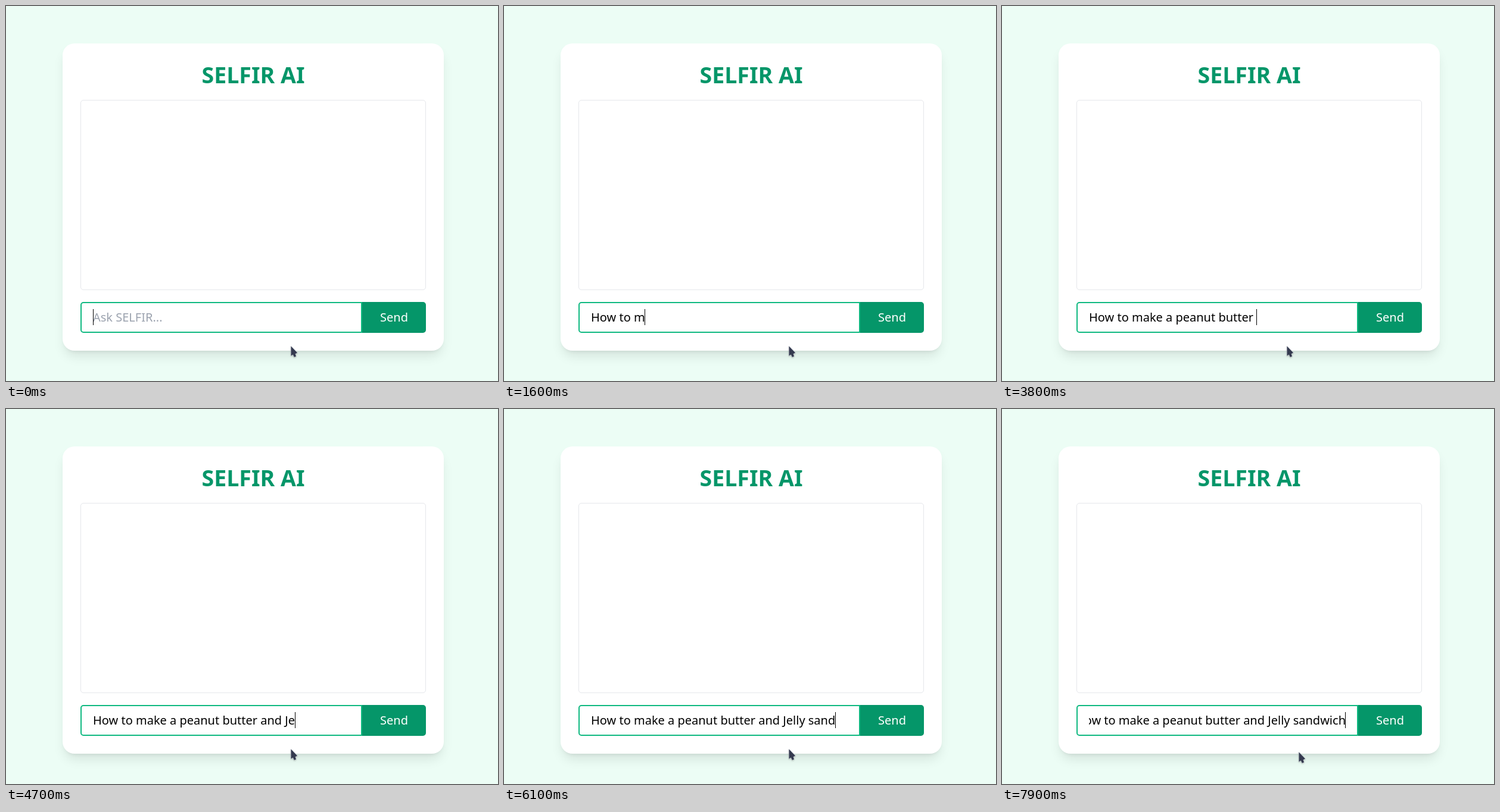
Animation, 826 px wide and 631 px high, one loop 8000 ms. Source, as an HTML page:

```html
<!DOCTYPE html>
<html lang="en">
<head>
<meta charset="utf-8">
<title>Chat prompt</title>
<style>
  * { box-sizing: border-box; }
  html, body { margin: 0; width: 100%; height: 100%; overflow: hidden; }
  body {
    position: relative;
    background: #ecfdf5;
    font: 20px/27px "Noto Sans", sans-serif;
  }
  body > *, .field > * { position: absolute; }
  .card {
    left: 95px; top: 63px; width: 640px; height: 517px;
    border-radius: 20px;
    background: #fff;
    box-shadow: 0 12.5px 18.75px -3.75px rgba(0, 0, 0, .1),
                0 5px 7.5px -5px rgba(0, 0, 0, .1);
  }
  h1 {
    left: 125px; top: 93px; width: 580px; margin: 0;
    font-size: 37.5px; line-height: 45px; font-weight: 700;
    text-align: center;
    color: #059669;
  }
  .log {
    left: 125px; top: 158px; width: 580px; height: 320px;
    border: 1px solid #e5e7eb;
    border-radius: 5px;
  }
  .frame {
    left: 125px; top: 498px; width: 473px; height: 52px;
    border: 2px solid #10b981;
    border-radius: 5px 0 0 5px;
  }
  .send {
    left: 598px; top: 498px; width: 107px; height: 52px;
    padding-top: 12px;
    border-radius: 0 5px 5px 0;
    background: #059669;
    color: #fff;
    text-align: center;
  }
  .field {
    left: 146px; top: 510px; width: 431px; height: 27px;
    overflow: hidden;
    white-space: pre;
    color: #000;
  }
  .hint { color: #9ca3af; }
  .caret { top: 0; left: 0; width: 1px; height: 27px; background: #000; }
  .pointer { left: 476px; top: 570px; filter: drop-shadow(0 1px 1px rgba(0, 0, 0, .25)); }
</style>
</head>
<body>
<div class="card"></div>
<h1>SELFIR AI</h1>
<div class="log"></div>
<div class="frame"></div>
<div class="send">Send</div>
<div class="field">
  <span class="hint">Ask SELFIR...</span>
  <span class="typed"></span>
  <div class="caret"></div>
</div>
<svg class="pointer" width="18" height="26" viewBox="0 0 18 26">
  <path d="M2.5 2.5V18.5L5.8 16.6L7.8 20.8L11 19.4L9.6 15.2L13 13.6Z"
        fill="#343a4f" stroke="#d5dbe0" stroke-width="1" paint-order="stroke"/>
</svg>
<script>
  const LOOP = 8000;
  const KEY_GAP = 100;
  const MOVE_AT = 7900;

  // Bursts of typing: start time, then the text added by each keystroke.
  const bursts = [
    [300, "H"], [600, "ow"], [1000, " to"], [1400, " "],
    [1600, "make a "], [2400, "peanut "], [3200, "butte"],
    [3800, ["r ", "a", "n", "d", " "]], [4500, "J"], [4700, "el"],
    [5000, "ly "], [5400, "san"], [6100, "dw"], [6600, "i"], [6900, "ch"]
  ];
  const keys = bursts.flatMap(([start, parts]) =>
    [...parts].map((text, i) => ({ at: start + i * KEY_GAP, text })));

  const find = name => document.querySelector("." + name);
  const field = find("field"), hint = find("hint"), typed = find("typed");
  const caret = find("caret"), pointer = find("pointer");

  function draw(t) {
    const text = keys.filter(k => k.at <= t).map(k => k.text).join("");
    if (typed.textContent !== text) typed.textContent = text;
    hint.style.visibility = text ? "hidden" : "visible";

    // Long text scrolls so that its end stays in view.
    const width = typed.getBoundingClientRect().width;
    const room = field.clientWidth;
    typed.style.left = Math.min(0, room - width) + "px";
    caret.style.left = Math.min(Math.floor(width), room - 1) + "px";

    pointer.style.transform = t >= MOVE_AT ? "translate(20px, 5px)" : "none";
  }

  // Drop the markup's line breaks, which would count inside the preformatted field.
  field.replaceChildren(hint, typed, caret);
  hint.style.left = typed.style.left = hint.style.top = typed.style.top = "0px";

  let origin = null;
  function tick(now) {
    origin ??= now;
    draw((now - origin) % LOOP);
    requestAnimationFrame(tick);
  }
  draw(0);
  requestAnimationFrame(tick);
</script>
</body>
</html>
```
